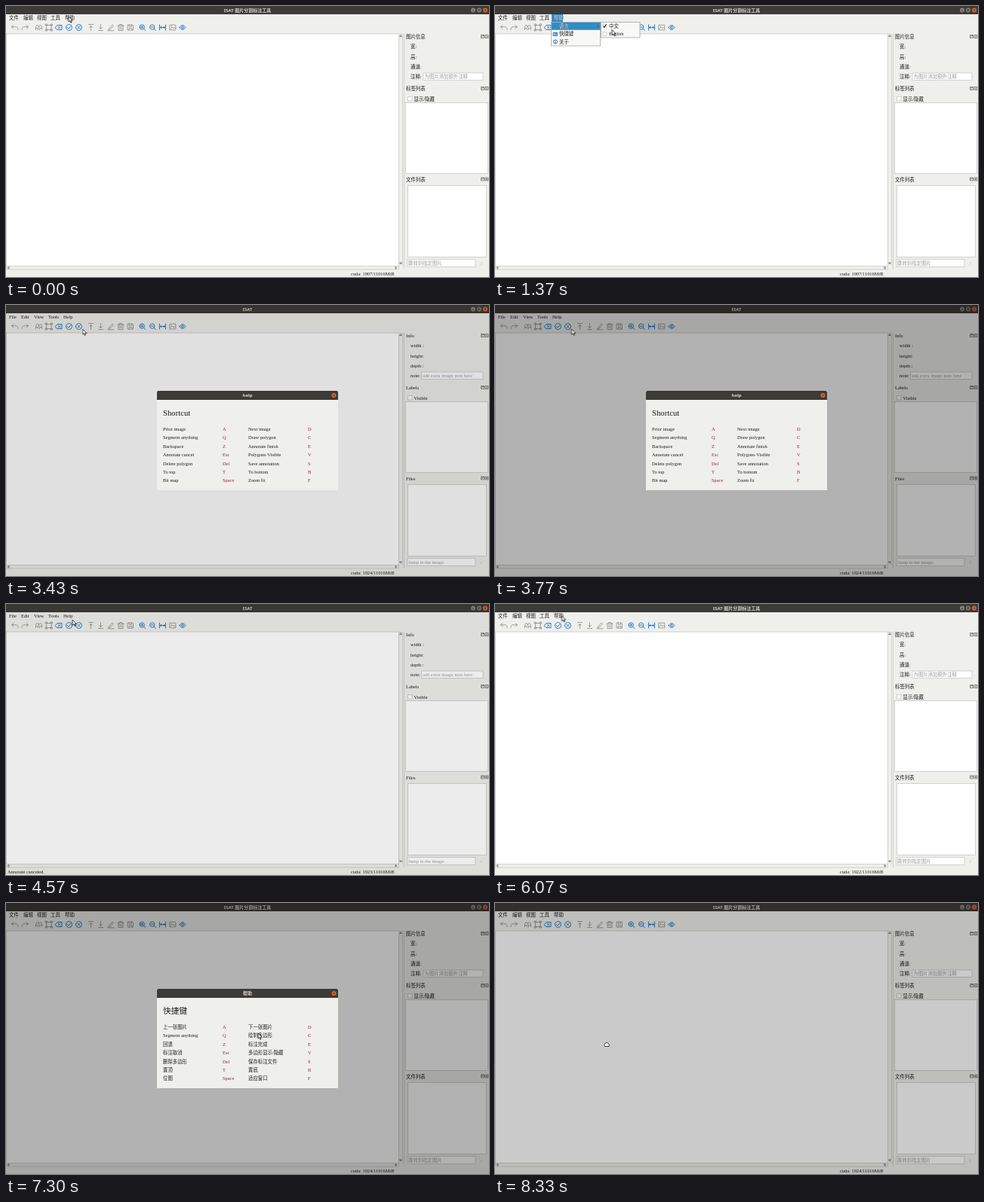
An HTML page for the animation above (8.36 s loop, 640 by 360 pixels).

```html
<!DOCTYPE html>
<html>
<head>
<meta charset="utf-8">
<title>ISAT</title>
<style>
  html, body { margin: 0; width: 100%; height: 100%; overflow: hidden; background: #efefec; }
  svg { display: block; width: 640px; height: 360px; }
  text { font: 6.4px "Liberation Serif", "Noto Sans CJK SC", "Noto Sans CJK", serif; fill: #1c1c1c; white-space: pre; }
  .title { font: bold 6px "Noto Sans", "Noto Sans CJK SC", "Noto Sans CJK", sans-serif; fill: #d8d6cc; text-anchor: middle; }
  .head { font-size: 10.7px; }
  .hint { fill: #9a9a9a; }
  .key { fill: #a01c48; }
  .lit { fill: #fff; }
  .panel { fill: #efefec; }
  .view { fill: #fff; stroke: #c2c2c0; stroke-width: .7; }
  .line { fill: none; stroke: #c8c8c6; stroke-width: .7; }
  .bar { fill: #3c3b37; }
  .menu { fill: #f8f8f6; stroke: #9a9a98; stroke-width: .7; }
  .hot { fill: #308cc6; }
  .icon { fill: none; stroke: #8c8c8c; stroke-width: .8; stroke-linecap: round; stroke-linejoin: round; }
  .blue { stroke: #2a7cc8; stroke-width: 1; }
  .tiny { fill: none; stroke: #5c5c5c; stroke-width: .7; }
  .tick { fill: none; stroke: #222; stroke-width: 1.1; }
  .dialog { transform-origin: 320px 180px; }
</style>
</head>
<body>
<svg id="stage" viewBox="0 0 640 360"></svg>
<script>
const LOOP = 8360;
const stage = document.getElementById('stage');

const text = (x, y, s, cls = '') => `<text x="${x}" y="${y}" class="${cls}">${s}</text>`;
const rect = (x, y, w, h, cls) => `<rect x="${x}" y="${y}" width="${w}" height="${h}" class="${cls}"/>`;
const path = (d, cls) => `<path d="${d}" class="${cls}"/>`;
const group = (cls, s) => `<g class="${cls}">${s}</g>`;
const both = (x, y, zh, en, cls = '', enX = x) =>
  text(x, y, zh, 'zh ' + cls) + text(enX, y, en, 'en ' + cls);
const ring = r => `M${-r} 0a${r} ${r} 0 1 0 ${2 * r} 0a${r} ${r} 0 1 0 ${-2 * r} 0`;

const button = (x, y, color, mark) =>
  `<circle cx="${x}" cy="${y}" r="3" fill="${color}"/>` +
  `<path transform="translate(${x} ${y})" d="${mark}" fill="none" stroke="#35342f" stroke-width=".8"/>`;
const CROSS = 'M-1.2-1.2L1.2 1.2M1.2-1.2L-1.2 1.2';

// Toolbar: centre x, shape around the centre, blue or grey
const LENS = 'M-4-.5a3.2 3.2 0 1 0 6.4 0a3.2 3.2 0 1 0-6.4 0M1.6 1.8L4 4';
const icons = [
  [12, 'M-2-3L-4.5-.8L-2 1.5M-4.5-.8H1Q4-.8 4 3'],
  [25, 'M2-3L4.5-.8L2 1.5M4.5-.8H-1Q-4-.8-4 3'],
  [43.5, 'M-4 3V0Q-4-3-2-3Q0-3 0 0Q0-3 2-3Q4-3 4 0V3M-4 1H-1V3M4 1H1V3'],
  [57, 'M-3-3H3V3H-3ZM-4.5-4.5h2v2h-2zM2.5-4.5h2v2h-2zM-4.5 2.5h2v2h-2zM2.5 2.5h2v2h-2z'],
  [70, 'M-4.5 0L-2-3H4V3H-2ZM-.8-1.3L1.8 1.3M1.8-1.3L-.8 1.3', 1],
  [83.5, ring(4) + 'M-2 0L-.5 1.6L2.2-1.4', 1],
  [96.5, ring(4) + 'M-1.5-1.5L1.5 1.5M1.5-1.5L-1.5 1.5', 1],
  [112.5, 'M-3-4H3M0 4V-2M-2 0L0-2L2 0'],
  [125.5, 'M-3 4H3M0-4V2M-2 0L0 2L2 0'],
  [139, 'M-2.5 1.5L2-3.5L3.5-2L-1 2.5L-3 3ZM-4 4.3H4'],
  [152, 'M-4-2.5H4M-1.5-2.5V-4H1.5V-2.5M-3-2.5V4H3V-2.5M-1-.5V2.2M1-.5V2.2'],
  [165, 'M-3.5-3.5H2.5L3.5-2.5V3.5H-3.5ZM-1.8-3.5V-1.2H1.5V-3.5M-1.8 3.5V1H1.8V3.5'],
  [181, LENS + 'M-2.4-.5H.8M-.8-2.1V1.1', 1],
  [194.5, LENS + 'M-2.4-.5H.8', 1],
  [207.5, 'M-4-3.5V3.5M4-3.5V3.5M-3 0H3M-1.7-1.3L-3 0L-1.7 1.3M1.7-1.3L3 0L1.7 1.3', 1],
  [221, 'M-3.8-3.3H3.8V3.3H-3.8ZM-3.8 2L-1-.5L1 1.2L2.3 0L3.8 1.5M-2-1.5h.6'],
  [234, 'M-4 0Q0-6 4 0Q0 6-4 0Z' + ring(1.4), 1],
];

const dock = (y, zh, en) => both(530, y + 2.5, zh, en) +
  path(`M629.5 ${y - 2}h4v4h-4zM631 ${y + 1}v-2h2M635 ${y - 2}h4v4h-4zM636 ${y - 1}l2 2m0-2l-2 2`, 'tiny');

const menuBar = [
  [4, '文件', 4, 'File'], [23, '编辑', 20, 'Edit'], [41, '视图', 37, 'View'],
  [59, '工具', 56, 'Tools'], [78, '帮助', 76, 'Help'],
];

const base =
  rect(0, 0, 640, 360, 'panel') +
  rect(0, 0, 640, 11, 'bar') +
  both(320, 8, 'ISAT 图片分割标注工具', 'ISAT', 'title') +
  button(619, 5.5, '#85837a', 'M-1.3 .5H1.3') +
  button(627, 5.5, '#85837a', 'M-1.1-1.1H1.1V1.1H-1.1Z') +
  button(635, 5.5, '#e6602c', CROSS) +
  group('open', rect(75, 11, 15, 10, 'hot')) +
  menuBar.map(([zx, zh, ex, en]) => both(zx, 18, zh, en, '', ex)).join('') +
  group('open', both(78, 18, '帮助', 'Help', 'lit', 76)) +
  icons.map(([x, d, blue]) =>
    `<path transform="translate(${x} 28.5)" d="${d}" class="icon${blue ? ' blue' : ''}"/>`).join('') +
  rect(.5, 37, 520, 308.5, 'view') +
  path('M520.5 37.5H525.5V345.5M.5 345.5V350H520.5V345.5', 'line') +
  path('M521.5 40.5l1.5-2l1.5 2zM521.5 341l1.5 2l1.5-2zM4 346.3l-2 1.5l2 1.5zM516 346.3l2 1.5l-2 1.5z', 'tiny') +
  path('M527.5 37V350', 'line') +
  dock(40.5, '图片信息', 'Info') +
  both(536, 56, '宽:', 'width :') +
  both(536, 69.5, '高:', 'height:') +
  both(536, 83, '通道:', 'depth :') +
  both(536, 96, '注释:', 'note:') +
  group('zh', rect(553, 89, 79, 9.5, 'view')) +
  group('en', rect(550.5, 89, 81.5, 9.5, 'view')) +
  both(554.5, 96, '为图片添加额外注释', 'add extra image note here', 'hint', 552) +
  dock(109.5, '标签列表', 'Labels') +
  rect(532.5, 120.5, 5.5, 5.5, 'view') +
  both(540.5, 125.5, '显示/隐藏', 'Visible') +
  rect(529.5, 128.5, 109, 94, 'view') +
  dock(230, '文件列表', 'Files') +
  rect(532.5, 238.5, 104, 95, 'view') +
  rect(532, 336.5, 90, 10, 'view') +
  both(533, 343.5, '跳转到指定图片', 'Jump to the image.', 'hint') +
  text(629, 343.5, '/', 'hint') +
  group('cancel', text(2, 357.5, 'Annotate canceled.')) +
  [1907, 1906, 1924, 1923, 1922].map(n =>
    group('mem' + n, text(457, 357.5, `cuda: ${n}/11016MiB`))).join('');

const tick = y => path(`M143.5 ${y}l1.5 1.8l2.5-4`, 'tick');
const menus = group('open',
  rect(74.5, 21.5, 65, 31.5, 'menu') +
  group('pick1', rect(75, 21.8, 64.5, 10, 'hot')) +
  group('pick2', rect(75, 32, 64.5, 10.3, 'hot')) +
  both(85, 28.5, '语言', 'Laguage') +
  both(85, 39, '快捷键', 'Shortcut') +
  both(85, 50, '关于', 'About') +
  group('pick1', both(85, 28.5, '语言', 'Laguage', 'lit')) +
  group('pick2', both(85, 39, '快捷键', 'Shortcut', 'lit')) +
  path('M136 25l2 1.8l-2 1.8z', 'tiny') +
  path('M77.5 35.5h5v4h-5zM78.5 38h3M79 36.7h2.5', 'icon blue') +
  `<path transform="translate(80 47.5)" d="${ring(2.6)}M0-.3V1.3M0-1.4v.1" class="icon blue"/>` +
  group('sub',
    rect(140.5, 21.5, 51.5, 20.5, 'menu') +
    rect(143, 24, 5, 5, 'line') + rect(143, 34.5, 5, 5, 'line') +
    text(151, 28.5, '中文') + text(151, 39, 'English') +
    group('zh', tick(26.5)) + group('en', tick(37))));

const shortcuts = [
  ['上一张图片', 'Prior image', 'A', '下一张图片', 'Next image', 'D'],
  ['Segment anything', 'Segment anything', 'Q', '绘制多边形', 'Draw polygon', 'C'],
  ['回退', 'Backspace', 'Z', '标注完成', 'Annotate finish', 'E'],
  ['标注取消', 'Annotate cancel', 'Esc', '多边形显示/隐藏', 'Polygons Visible', 'V'],
  ['删除多边形', 'Delete polygon', 'Del', '保存标注文件', 'Save annotation', 'S'],
  ['置顶', 'To top', 'T', '置底', 'To bottom', 'B'],
  ['位图', 'Bit map', 'Space', '适应窗口', 'Zoom fit', 'F'],
];
const dialog = group('dialog',
  rect(200, 114, 240, 132, 'panel') +
  path('M200 126V116q0-2 2-2H438q2 0 2 2V126z', 'bar') +
  both(320, 122, '帮助', 'help', 'title') +
  button(434.5, 120, '#e6602c', CROSS) +
  both(208, 146.5, '快捷键', 'Shortcut', 'head') +
  shortcuts.map(([zh1, en1, k1, zh2, en2, k2], i) => {
    const y = 167 + i * 11.4;
    return both(208, y, zh1, en1) + text(287, y, k1, 'key') +
      both(321, y, zh2, en2) + text(400, y, k2, 'key');
  }).join(''));

const pointer = `<g id="pointer" fill="#fff" stroke="#111" stroke-width=".8" stroke-linejoin="round">
  <path class="arrow" d="M0 0V7.2L1.7 5.7L2.9 8.3L4.1 7.7L2.9 5.3H5.2Z"/>
  <path class="hand" d="M-2.5 4.5Q-4 2-2.5 1.5Q-2-.5 0-.5Q2-.5 2.5 1.2Q4 2 3 4.5Z"/></g>`;

stage.innerHTML = base + menus + rect(0, 0, 640, 360, 'dim') + dialog + pointer;

// Stops are [time, value]
function play(el, prop, stops, easing = 'linear') {
  const frames = stops.map(([ms, v]) => ({ offset: ms / LOOP, [prop]: v, easing }));
  el.animate(frames, { duration: LOOP, iterations: Infinity });
}

// Visible only inside the given [from, to] spans
function show(cls, ...spans) {
  const stops = spans.flatMap(([a, b]) => [[a, 1], [b, 0]]).filter(([ms]) => ms < LOOP);
  if (stops[0][0] > 0) stops.unshift([0, 0]);
  stops.push([LOOP, stops[stops.length - 1][1]]);
  stage.querySelectorAll('.' + cls).forEach(el => play(el, 'opacity', stops, 'steps(1, end)'));
}

show('zh', [0, 1620], [5500, LOOP]);
show('en', [1620, 5500]);
show('open', [150, 1620], [2250, 3250], [4750, 5500], [6200, 6700]);
show('sub', [600, 1620], [2600, 3050], [5020, 5500]);
show('pick1', [500, 1620], [2550, 3050], [4950, 5500]);
show('pick2', [3050, 3250], [6450, 6700]);
show('cancel', [4380, 4750]);
show('arrow', [0, 8240]);
show('hand', [8240, LOOP]);
show('mem1907', [0, 1500]);
show('mem1906', [1500, 3300]);
show('mem1924', [3300, 4400], [6750, LOOP]);
show('mem1923', [4400, 5500]);
show('mem1922', [5500, 6750]);

// The dialog unfolds from its middle line and folds back
const unfold = [
  [0, 0], [3270, 0], [3370, 1], [4300, 1], [4380, 0],
  [6720, 0], [6820, 1], [8160, 1], [8240, 0], [LOOP, 0],
];
const box = stage.querySelector('.dialog');
play(box, 'opacity', unfold);
play(box, 'transform', unfold.map(([ms, v]) => [ms, `scale(1, ${v})`]));

// The window behind it darkens, at most by 30 %
const shade = [
  [0, 0], [3270, 0], [3670, 1], [4383, 1], [4633, 0],
  [6720, 0], [7120, 1], [8255, 1], [LOOP, .58],
];
play(stage.querySelector('.dim'), 'opacity', shade.map(([ms, v]) => [ms, v * .3]));

const route = [
  [0, 83, 14], [200, 83, 14], [700, 100, 26], [1000, 130, 28], [1250, 150, 27],
  [1500, 160, 36], [1650, 160, 36], [2050, 82, 16], [2300, 84, 15], [2700, 118, 27],
  [2830, 125, 27], [3050, 106, 33], [3270, 101.5, 32], [3770, 101.5, 32],
  [4300, 98, 28], [4570, 88, 21], [4750, 84, 16], [5000, 100, 27], [5300, 152, 27],
  [5600, 152, 27], [6070, 88.5, 15.5], [6250, 86, 16], [6600, 100, 36], [6720, 100, 36],
  [6900, 150, 70], [7300, 334, 173], [7600, 334, 173], [8150, 148, 186], [LOOP, 148, 186],
];
play(document.getElementById('pointer'), 'transform',
  route.map(([ms, x, y]) => [ms, `translate(${x}px, ${y}px)`]));
</script>
</body>
</html>
```
